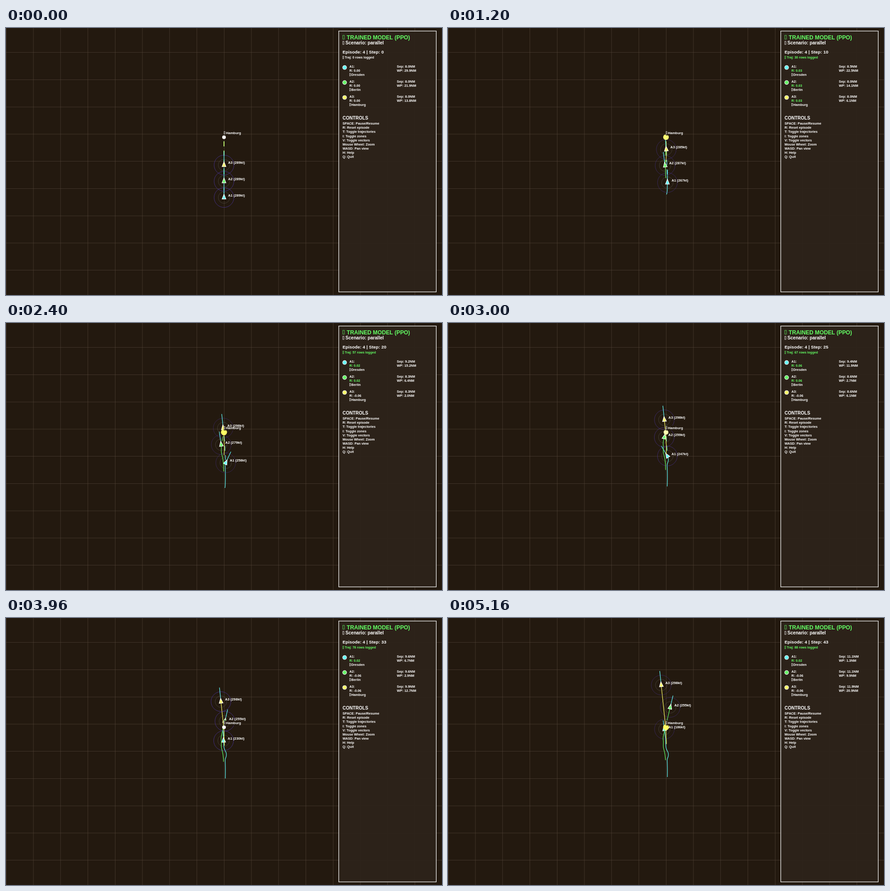
Write an HTML page with a canvas that moves like this. It is 956 px wide and 586 px high and loops after 5.28 s.

```html
<!DOCTYPE html>
<html lang="en">
<head>
<meta charset="utf-8">
<title>Trained model playback</title>
<style>
  html, body { margin: 0; width: 100%; height: 100%; overflow: hidden; background: #23190f; }
  canvas { display: block; }
</style>
</head>
<body>
<canvas id="stage" width="956" height="586"></canvas>
<script>
const ctx = document.getElementById('stage').getContext('2d');
const STEP_MS = 120, STEPS = 44;
const CELL = 59.75;                    // grid spacing in px
const NM = 4.44;                       // px per nautical mile
const KT = NM / 363;                   // px per step for one knot
const GOAL = { x: 478, y: 239.3 };
const BG = '#23190f', WHITE = '#fff', GREEN = '#64ff64', CYAN = '#64ffff';

// Each agent flies from `dist` NM south of the goal, steering through
// [step, value] points; it logs nothing more once `done`.
const AGENTS = [
  { id: 'A1', city: 'Dresden', color: CYAN, dist: 29.9, done: STEPS,
    heading: [[0, 0], [2, 20], [4, 3], [18, -3], [20, 25], [25, -31], [29, -2], [43, -8]],
    speed: [[0, 289], [6, 262], [14, 271], [33, 230], [43, 186]] },
  { id: 'A2', city: 'Berlin', color: GREEN, dist: 21.87, done: 28,
    heading: [[0, 0], [3, -6], [6, 0], [14, -15.5], [17, 5], [20, -8.5], [22, 12], [28, 13.5]],
    speed: [[0, 289], [6, 281], [14, 292], [20, 279], [26, 255]] },
  { id: 'A3', city: 'Hamburg', color: '#ffff64', dist: 13.84, done: 17,
    heading: [[0, 0], [6, 4], [10, -5], [14, 0], [17, -6]],
    speed: [[0, 289], [6, 274], [14, 295], [17, 298]] }
];
const CONTROLS = ['SPACE: Pause/Resume', 'R: Reset episode', 'T: Toggle trajectories',
  'I: Toggle zones', 'V: Toggle vectors', 'Mouse Wheel: Zoom', 'WASD: Pan view',
  'H: Help', 'Q: Quit'];

function at(points, s) {
  const i = points.findIndex(p => p[0] > s);
  if (i < 0) return points[points.length - 1][1];
  const [s0, v0] = points[i - 1], [s1, v1] = points[i];
  return v0 + (v1 - v0) * (s - s0) / (s1 - s0);
}

const course = (a, s) => at(a.heading, s) * Math.PI / 180;
const ahead = (p, h, len) => ({ x: p.x + Math.sin(h) * len, y: p.y - Math.cos(h) * len });
const gap = (p, q) => Math.hypot(p.x - q.x, p.y - q.y) / NM;
const wave = s => Math.cos(s * Math.PI / 16);

function fly(a) {
  const path = [{ x: GOAL.x, y: GOAL.y + a.dist * NM }];
  for (let s = 0; s < STEPS - 1; s++) {
    path.push(ahead(path[s], course(a, s + .5), at(a.speed, s + .5) * KT));
  }
  return path;
}
AGENTS.forEach(a => { a.path = fly(a); });

function reward(a, s) {
  if (s > a.done) return -.06;
  return s ? .042 + .025 * Math.sin(s * .52 - 5.7) : 0;
}

// y is the middle of the capitals
function text(str, x, y, size = 7.3, color = WHITE) {
  ctx.font = `bold ${size}px "Liberation Sans", Arial, sans-serif`;
  ctx.fillStyle = color;
  ctx.fillText(str, x, y + size * .36);
}

function tofu(x, y, w, h, color = WHITE) {
  ctx.strokeStyle = color;
  ctx.lineWidth = .7;
  ctx.strokeRect(x + .5, y - h / 2, w, h);
}

function line(points, color, width = 1.2) {
  ctx.beginPath();
  points.forEach(p => ctx.lineTo(p.x, p.y));
  ctx.strokeStyle = color;
  ctx.lineWidth = width;
  ctx.stroke();
}

function circle(x, y, r, fill, stroke, width = 1) {
  ctx.beginPath();
  ctx.arc(x, y, r, 0, Math.PI * 2);
  if (fill) { ctx.fillStyle = fill; ctx.fill(); }
  if (stroke) { ctx.strokeStyle = stroke; ctx.lineWidth = width; ctx.stroke(); }
}

function drawGrid() {
  ctx.fillStyle = BG;
  ctx.fillRect(0, 0, 956, 586);
  ctx.fillStyle = '#55473b';
  for (let x = 0; x < 956; x += CELL) ctx.fillRect(x, 0, .6, 586);
  for (let y = 53.4; y < 586; y += CELL) ctx.fillRect(0, y, 956, .6);
}

function drawAgent(a, s) {
  const p = a.path[s], h = course(a, s);
  line(a.path.slice(Math.round(s * .17), s + 1), a.color);
  if (s <= a.done) {
    ctx.setLineDash([11, 9.5]);
    ctx.lineDashOffset = 11;
    line([GOAL, p], a.color);
    ctx.setLineDash([]);
  }
  circle(p.x, p.y, 21.7, null, `rgba(72,52,150,${.6 + .2 * wave(s)})`);
  circle(p.x, p.y, 12.7, null, 'rgba(105,105,100,.42)');
  line([p, ahead(p, h, at(a.speed, s) * .104)], CYAN);

  ctx.save();
  ctx.translate(p.x, p.y);
  ctx.rotate(h);
  ctx.beginPath();
  ctx.moveTo(0, -7.2);
  ctx.lineTo(4.2, 3.4);
  ctx.lineTo(-4.2, 3.4);
  ctx.closePath();
  ctx.fillStyle = a.color;
  ctx.fill();
  ctx.strokeStyle = WHITE;
  ctx.lineWidth = 1.2;
  ctx.stroke();
  ctx.restore();
}

function drawGoal(s) {
  const pulse = (1 - wave(s)) / 2;
  const blue = Math.round(255 - 155 * Math.min(1, pulse * 1.3));
  circle(GOAL.x, GOAL.y + .4, 4 + 3.1 * pulse, `rgb(255,255,${blue})`);
  ctx.fillStyle = BG;
  ctx.fillRect(477.5, 225, 39, 10.6);
  tofu(477.5, 230, 2, 6);
  text('Hamburg', 482.3, 230, 7.5);
}

function drawPanel(s) {
  ctx.fillStyle = 'rgba(45,35,27,.92)';
  ctx.fillRect(729, 6, 215, 573.6);
  ctx.strokeStyle = WHITE;
  ctx.lineWidth = 1.2;
  ctx.strokeRect(729.6, 6.6, 213.8, 572.6);

  tofu(738, 20.3, 3.6, 8.5, GREEN);
  text('TRAINED MODEL (PPO)', 747, 20.2, 12.2, GREEN);
  tofu(738, 32.6, 2.6, 7);
  text('Scenario: parallel', 744.2, 32.6, 10.1);
  text(`Episode: 4 | Step: ${s}`, 738, 52.2, 9.8);

  const rows = AGENTS.reduce((n, a) => n + Math.min(s, a.done), 0);
  const rowColor = rows ? GREEN : WHITE;
  tofu(738, 64.6, 1.9, 5.5, rowColor);
  text(`Traj: ${rows} rows logged`, 742.8, 64.6, 7.05, rowColor);

  const spots = AGENTS.map(a => a.path[s]);
  AGENTS.forEach((a, i) => {
    const y = 84.5 + i * 32.9, r = reward(a, s);
    const others = spots.filter(p => p !== spots[i]);
    const sep = Math.min(...others.map(p => gap(spots[i], p)));
    circle(742.5, y + 2.2, 4.3, a.color, WHITE, 1.1);
    text(a.id + ':', 753, y);
    text(`R: ${r.toFixed(2)}`, 753, y + 9, 7.2, r > 0 ? GREEN : WHITE);
    tofu(753, y + 17.9, 1.9, 5.5);
    text(a.city, 757, y + 17.9);
    text(`Sep: ${sep.toFixed(1)}NM`, 857, y, 7.4);
    text(`WP: ${gap(spots[i], GOAL).toFixed(1)}NM`, 857, y + 9, 7.4);
  });

  text('CONTROLS', 738, 197, 10);
  CONTROLS.forEach((c, i) => text(c, 738, 209.5 + i * 9.13, 7.25));
}

function draw(s) {
  drawGrid();
  AGENTS.forEach(a => drawAgent(a, s));
  drawGoal(s);
  AGENTS.forEach(a => {
    const p = a.path[s];
    text(`${a.id} (${Math.round(at(a.speed, s))}kt)`, p.x + 9, p.y - 5.2, 7.7);
  });
  drawPanel(s);
}

const start = performance.now();
function tick() {
  draw(Math.floor((performance.now() - start) / STEP_MS) % STEPS);
  requestAnimationFrame(tick);
}
tick();
</script>
</body>
</html>
```
